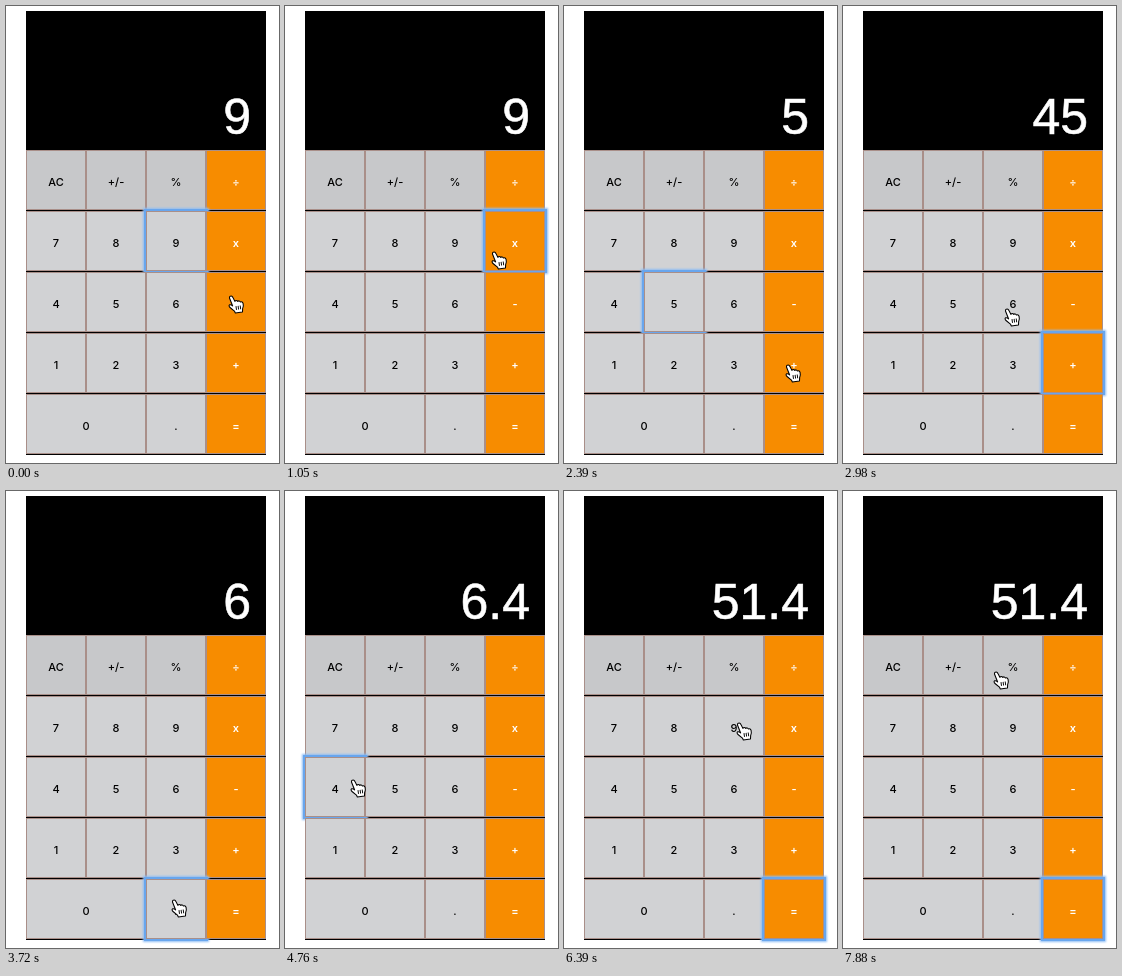
An HTML page that plays this animation: 273x457 px, repeating every 8000 ms.

```html
<!DOCTYPE html>
<html lang="en">
<head>
<meta charset="utf-8">
<title>Calculator</title>
<style>
  html, body { margin: 0; width: 100%; height: 100%; overflow: hidden; background: #fff; }
  #calculator { position: absolute; left: 20px; top: 5px; width: 240px; height: 444px; background: #000; }
  #display {
    position: absolute; right: 15px; top: 81px; color: #fff;
    font: 50px/50px "Liberation Sans", Arial, sans-serif;
    -webkit-text-stroke: .6px #fff;
  }
  .key {
    position: absolute; box-sizing: border-box; width: 60px; height: 60px;
    border: 1px solid #a98f89; background: #d1d2d4; color: #000;
    font: 500 11px/62px Inter, sans-serif; text-align: center;
  }
  .key.top { background: #c7c8ca; }
  .key.operator { background: #f78c00; color: #fff; font-weight: 600; }
  .key.wide { width: 120px; }
  .key.focused { box-shadow: 0 0 0 2px #68a6ee, 0 0 2px 3px #8fbdf4; }
  #pointer { position: absolute; left: -10px; top: -10px; width: 20px; height: 20px; }
</style>
</head>
<body>
<div id="calculator"><div id="display"></div></div>
<svg id="pointer" viewBox="-10 -10 20 20" fill="#fff" stroke="#000" stroke-linejoin="round">
  <g transform="rotate(-8) scale(1.06)">
    <path d="M-5.3-6.5Q-5-8.4-3.4-8.1Q-2.4-7.9-1.9-6.2L-.7-2.6Q.8-4 2-2.2Q3.6-3.2 4.4-1.3Q6.4-1.8 6.7.4Q7 3 5.6 5.2L5 8.3H-1.8L-2.4 6.4L-6.3 2.2Q-7.3.5-6-.1Q-4.9-.4-3.4 1.4Z"/>
    <path d="M-.3 2V5.5M1.7 2V5.5M3.7 2V5.5" stroke-width=".9"/>
  </g>
</svg>
<script>
const LOOP = 8000, STEP = 148.4;  // the picture advances in fixed steps
const GLIDE = 4;                  // steps the pointer takes between stops

// Where the pointer arrives; stops with a key press it one step later.
const stops = [
  { at: -1, x: 230, y: 308, key: "9", shows: "9" },
  { at: 3, x: 231, y: 245, key: "x", shows: "9" },
  { at: 10, x: 124, y: 304, key: "5", shows: "5" },
  { at: 16, x: 229, y: 367, key: "+", shows: "45" },
  { at: 20, x: 169, y: 311, key: "6", shows: "6" },
  { at: 24, x: 173, y: 417, key: ".", shows: "6" },
  { at: 29, x: 73, y: 297, key: "4", shows: "6.4" },
  { at: 36, x: 227, y: 420, key: "=", shows: "51.4" },
  { at: 43, x: 180, y: 240 },
  { at: 46, x: 167, y: 195 },
  { at: 53, x: 158, y: 189 }
];

const calculator = document.getElementById("calculator");
const display = document.getElementById("display");
const pointer = document.getElementById("pointer");
const keys = {};

["AC +/- % ÷", "7 8 9 x", "4 5 6 -", "1 2 3 +", "0 . ="].forEach((labels, row) => {
  let x = 0;
  for (const label of labels.split(" ")) {
    const key = document.createElement("div");
    key.className = "key";
    key.classList.toggle("top", row === 0);
    key.classList.toggle("operator", x === 180);
    key.classList.toggle("wide", label === "0");
    key.style.left = x + "px";
    key.style.top = 139 + 61 * row + "px";
    key.textContent = label;
    calculator.append(key);
    keys[label] = key;
    x += label === "0" ? 120 : 60;
  }
});

function pointerAt(step) {
  const i = stops.findIndex(stop => stop.at >= step);
  if (i < 0) return stops[stops.length - 1];
  const from = stops[i - 1], to = stops[i];
  const leave = Math.max(from.at, to.at - GLIDE);
  const k = Math.max(0, (step - leave) / (to.at - leave));
  const eased = k * k * (3 - 2 * k);
  return { x: from.x + (to.x - from.x) * eased, y: from.y + (to.y - from.y) * eased };
}

function render(now) {
  const step = Math.floor((now % LOOP) / STEP);
  const pressed = stops.filter(stop => stop.key && stop.at + 1 <= step).pop();
  const { x, y } = pointerAt(step);
  for (const label in keys) keys[label].classList.toggle("focused", label === pressed.key);
  display.textContent = pressed.shows;
  pointer.style.transform = `translate(${Math.round(x)}px, ${Math.round(y)}px)`;
}

const start = performance.now();
function tick() {
  render(performance.now() - start);
  requestAnimationFrame(tick);
}
tick();
</script>
</body>
</html>
```
